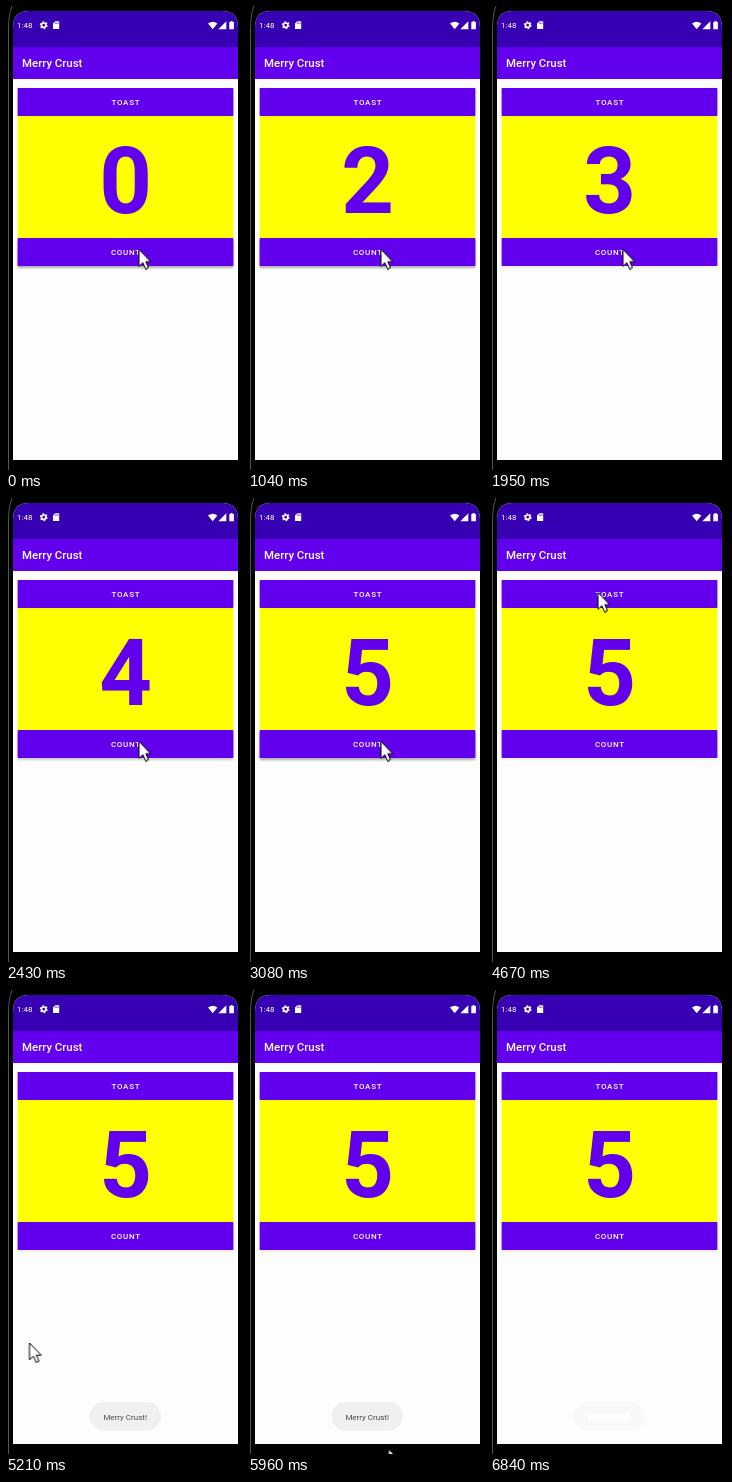
Animation of 236x464 px, one loop 7.41 s. Source, as an HTML page:

```html
<!DOCTYPE html>
<html lang="en">
<head>
<meta charset="utf-8">
<title>Counter app</title>
<style>
html, body { margin: 0; width: 100%; height: 100%; overflow: hidden; background: #000; }
svg { display: block; width: 236px; height: 464px; font-family: Roboto, sans-serif; }
.title { font-size: 11.45px; font-weight: 500; fill: #fff; }
.clock { font-size: 8px; fill: #fff; }
.label { font-size: 8px; font-weight: 500; letter-spacing: .0893em; text-anchor: middle; fill: #fff; }
.digits { font-size: 92px; font-weight: 700; text-anchor: middle; fill: #6200ee; }
.note { font-size: 8px; text-anchor: middle; fill: #444; }
.shadow { filter: blur(1.3px); fill: #000; }

.digits, .count-shadow, .toast-shadow, .pill, .note, .gap, .cursor {
  animation: 7.41s step-end infinite;
}
.digits { animation-name: digits; }
.count-shadow { animation-name: count-press; }
.toast-shadow { animation-name: toast-press; }
.pill { animation-name: pill; }
.note { animation-name: note; }
.gap { animation-name: gap; }
.cursor { animation-name: cursor; }

/* Digits sit 130px apart in a clipped column. */
@keyframes digits {
  0% { transform: translateY(0); }
  3.77% { transform: translateY(-130px); }
  14.03% { transform: translateY(-260px); }
  24.29% { transform: translateY(-390px); }
  31.17% { transform: translateY(-520px); }
  39.94%, 100% { transform: translateY(-650px); }
}
@keyframes count-press {
  0%, 14.03%, 20.64%, 29.55%, 39.94% { opacity: .32; }
  24.29%, 32.79%, 43.18% { opacity: .2; }
  5.39%, 17.27%, 26.31%, 34.41%, 44.8%, 100% { opacity: .06; }
}
@keyframes toast-press {
  0%, 63.02%, 100% { opacity: .06; }
  59.78% { opacity: .3; }
}
@keyframes pill {
  0% { opacity: 0; }
  65.04% { opacity: .35; }
  66.66% { opacity: .65; }
  68.28% { opacity: .85; }
  70.31% { opacity: 1; }
  87.44% { opacity: .85; }
  89.06% { opacity: .65; }
  90.68% { opacity: .45; }
  92.3%, 100% { opacity: .33; }
}
@keyframes note {
  0% { opacity: 0; }
  65.04% { opacity: .25; }
  66.66% { opacity: .55; }
  68.28% { opacity: .8; }
  70.31% { opacity: .95; }
  71.92% { opacity: 1; }
  87.44% { opacity: .75; }
  89.06% { opacity: .45; }
  90.68% { opacity: .2; }
  92.3%, 100% { opacity: 0; }
}
@keyframes gap {
  0% { opacity: 0; }
  92.3%, 100% { opacity: 1; }
}
@keyframes cursor {
  0% { transform: translate(133px, 243.5px); }
  44.8% { transform: translate(128px, 215px); }
  46.42% { transform: translate(113px, 140px); }
  48.04% { transform: translate(102px, 82px); }
  49.66% { transform: translate(100.5px, 86.5px); }
  51.28% { transform: translate(105px, 89.5px); }
  52.9% { transform: translate(107.3px, 93.5px); }
  54.92% { transform: translate(108px, 94.5px); }
  65.04% { transform: translate(102px, 150px); }
  66.66% { transform: translate(88px, 250px); }
  68.28% { transform: translate(70.5px, 339.5px); }
  70.31% { transform: translate(23.5px, 353px); }
  71.92% { transform: translate(30px, 365px); }
  73.54% { transform: translate(49px, 385px); }
  75.16% { transform: translate(75px, 406px); }
  76.78% { transform: translate(94.5px, 421.5px); }
  78.81% { transform: translate(120px, 442px); }
  80.43% { transform: translate(140.5px, 459px); }
  82.45%, 100% { transform: translate(150px, 490px); }
}
</style>
</head>
<body>
<svg viewBox="0 0 236 464">
  <defs>
    <clipPath id="screen"><path d="M7 454V21Q7 5 23 5H216Q232 5 232 21V454Z"/></clipPath>
    <clipPath id="panel"><rect x="11.6" y="110" width="215.8" height="122"/></clipPath>
  </defs>

  <rect width="236" height="464"/>
  <path d="M6 0Q2.5 8 2.5 24V464" fill="none" stroke="#555"/>

  <g clip-path="url(#screen)">
    <rect x="7" y="5" width="225" height="449" fill="#fdfdfd"/>
    <rect x="7" y="5" width="225" height="36" fill="#3700b3"/>
    <rect x="7" y="41" width="225" height="32" fill="#6200ee"/>
  </g>

  <!-- Status bar -->
  <text class="clock" x="11" y="22.2">1:48</text>
  <g fill="#fff">
    <circle cx="37.7" cy="19.2" r="2.2" fill="none" stroke="#fff" stroke-width="1.7"/>
    <circle cx="37.7" cy="19.2" r="3.3" fill="none" stroke="#fff" stroke-width="1.3" stroke-dasharray="1.75 1.706"/>
    <path d="M47 17.5L49.3 15.2H53.2V23H47Z"/>
    <path d="M49.4 16.4v1.6M50.8 16.4v1.6M52.1 16.4v1.6" stroke="#3700b3" stroke-width=".6"/>
    <path d="M202 17.6Q206.7 14 211.4 17.6L206.7 23.2Z"/>
    <path d="M212.3 23.2L220.3 15.3V23.2Z"/>
    <path d="M223.3 16H224.6V15.1H226.6V16H227.9V23.2H223.3Z"/>
  </g>

  <text class="title" x="16.1" y="61.4">Merry Crust</text>

  <!-- Panel and buttons -->
  <rect x="11.6" y="110" width="215.8" height="122" fill="#ff0"/>
  <g clip-path="url(#panel)">
    <g class="digits">
      <text x="119.6" y="207.3">0</text>
      <text x="119.6" y="337.3">1</text>
      <text x="119.6" y="467.3">2</text>
      <text x="119.6" y="597.3">3</text>
      <text x="119.6" y="727.3">4</text>
      <text x="119.6" y="857.3">5</text>
    </g>
  </g>
  <rect class="shadow toast-shadow" x="11.6" y="84" width="215.8" height="26.5"/>
  <rect class="shadow count-shadow" x="11.6" y="235" width="215.8" height="27"/>
  <g fill="#6200ee">
    <rect x="11.6" y="82" width="215.8" height="28" rx=".8"/>
    <rect x="11.6" y="232" width="215.8" height="28" rx=".8"/>
  </g>
  <text class="label" x="119.9" y="99.2">TOAST</text>
  <text class="label" x="119.9" y="249.2">COUNT</text>

  <!-- Message -->
  <rect class="pill" x="83.5" y="412" width="71.5" height="28.5" rx="14.2" fill="#f0f0f0"/>
  <rect class="gap" x="98" y="423.5" width="42" height="7" fill="#fefefe"/>
  <text class="note" x="119.2" y="429.5">Merry Crust!</text>

  <path class="cursor" d="M0 0V16.8L3.8 13.2L6.7 19.5L9.5 18.2L6.8 12.2H11.7Z" fill="#fff" stroke="#000" stroke-width="1" stroke-linejoin="round"/>
</svg>
</body>
</html>
```
